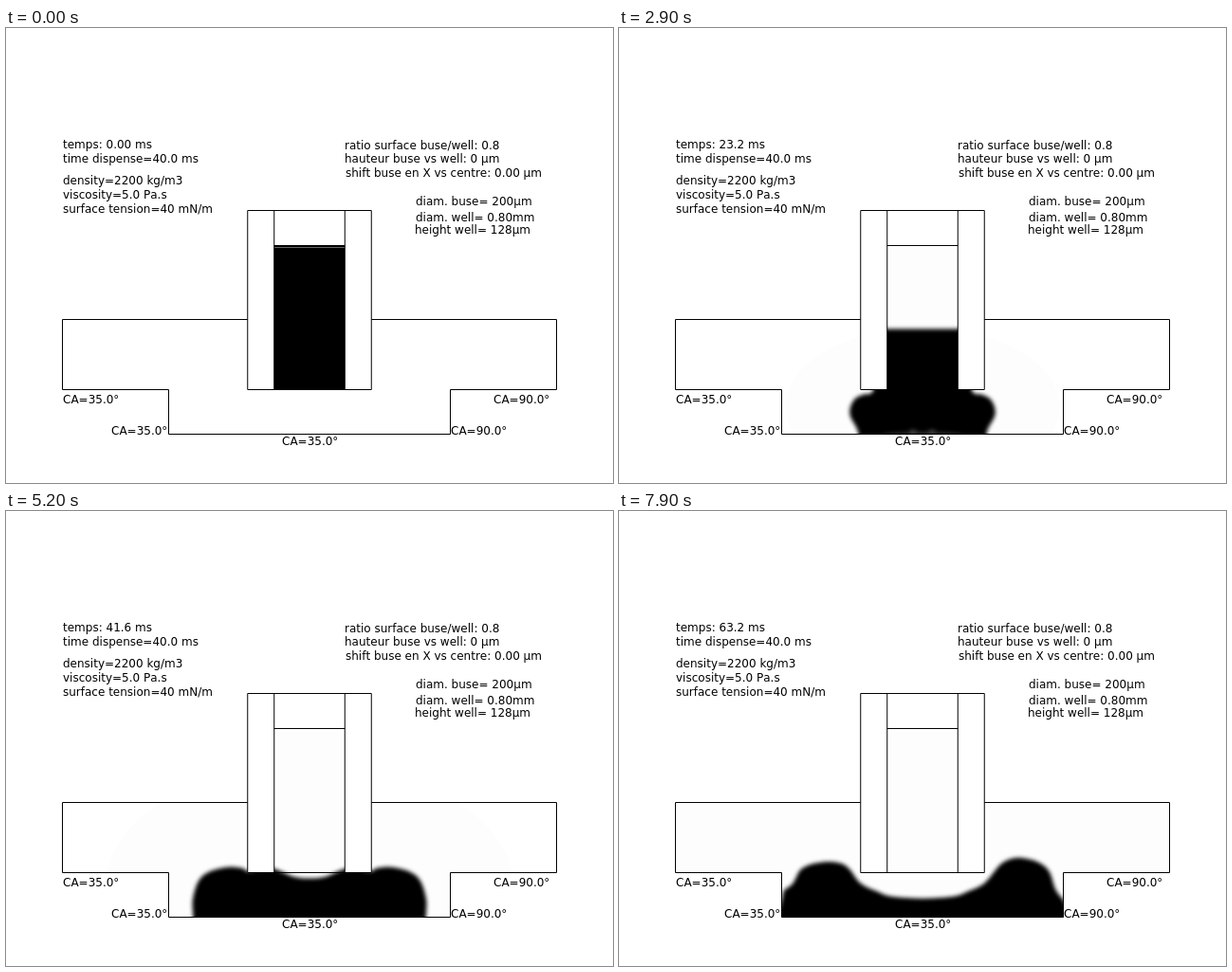
An HTML page that plays this animation: 640 by 480 pixels, repeating every 8 s.

```html
<!DOCTYPE html>
<html lang="fr">
<head>
<meta charset="utf-8">
<style>
  html, body { margin: 0; width: 100%; height: 100%; overflow: hidden; background: #fff; }
  svg { display: block; }
  .label {
    position: absolute; white-space: pre; color: #000;
    font: 12px/14px "DejaVu Sans", sans-serif; font-kerning: none;
  }
</style>
</head>
<body>
<svg width="640" height="480" viewBox="0 0 640 480">
  <defs>
    <clipPath id="cavity">
      <path d="M59.5 307.5H254.75V381.5H282.75V229.5H357.25V381.5H385.25V307.5H580.5V381.5H468.5V428.5H171.5V381.5H59.5Z"/>
    </clipPath>
    <filter id="soft" filterUnits="userSpaceOnUse" x="0" y="150" width="640" height="330">
      <feGaussianBlur stdDeviation="2"/>
    </filter>
  </defs>
  <g clip-path="url(#cavity)">
    <g id="haze" fill="#fdfdfd">
      <ellipse id="halo" cx="320" cy="400"/>
      <rect x="282" y="229" width="76" height="153"/>
    </g>
    <path id="liquid"/>
    <g id="film" filter="url(#soft)" fill="#aaa">
      <ellipse cx="310" cy="428" rx="5" ry="4"/>
      <ellipse cx="330" cy="428" rx="5" ry="4"/>
      <ellipse cx="320" cy="429" rx="42" ry="3" fill="#555"/>
    </g>
    <path id="skin" d="M283 231.5H357" stroke="#666"/>
  </g>
  <path fill="none" stroke="#000" d="M254.75 307.5H59.5V381.5H171.5V428.5H468.5V381.5H580.5V307.5H385.25
    M254.75 192.5H385.25V381.5H254.75ZM282.75 192.5V381.5M357.25 192.5V381.5M282.75 229.5H357.25"/>
</svg>
<script>
const $ = id => document.getElementById(id);
const LOOP = 8000, STEP = 100, CX = 320;

// Each label stands with its baseline at y
function label(x, y, str) {
  const el = document.createElement('div');
  el.className = 'label';
  el.style.left = x + 'px';
  el.style.top = y - 11 + 'px';
  el.textContent = str;
  return document.body.appendChild(el);
}
const clock = label(60, 127, '');
label(60, 142, 'time dispense=40.0 ms');
label(60, 165, 'density=2200 kg/m3');
label(60, 180, 'viscosity=5.0 Pa.s');
label(60, 195, 'surface tension=40 mN/m');
label(357, 128, 'ratio surface buse/well: 0.8');
label(357, 142, 'hauteur buse vs well: 0 µm');
label(358, 157, 'shift buse en X vs centre: 0.00 µm');
label(432, 187, 'diam. buse= 200µm');
label(432, 204, 'diam. well= 0.80mm');
label(431, 217, 'height well= 128µm');
label(60, 396, 'CA=35.0°');
label(111, 429, 'CA=35.0°');
label(291, 440, 'CA=35.0°');
label(469, 429, 'CA=90.0°');
label(514, 396, 'CA=90.0°');

const ramp = (t, a, b) => Math.min(1, Math.max(0, (t - a) / (b - a)));
const mix = (a, b, k) => a + (b - a) * k;

// Height of the liquid on the axis: drains steadily, then settles
const surfaceAt = t => t < 5.2 ? 229 + 30.5 * t : 409 - 21.4 * Math.exp((5.2 - t) / .6);

// Half outline at t seconds, from below the floor, out, up and in towards the axis
function halfOutline(t, left) {
  const landed = ramp(t, 1.8, 2.4);
  const freed = ramp(t, 5.2, 6);
  const climb = ramp(t, 6.3, 7.9);
  const tilt = left ? 4 * freed : 0;

  const spread = t - 1.8;
  const sideX = Math.min(141, Math.max(36, 50.5 + 25 * spread - 1.1 * spread ** 2)) - tilt;
  const footX = sideX - 20 * (1 - ramp(t, 1.8, 3.8)) + 10 * climb;
  const footY = 380 + 48 * (1 - Math.exp(-t / .85)) + landed - (left ? 26 : 13) * climb;
  const sideY = mix(381, footY, .56);

  const humpX = sideX - 36 * ramp(t, 1.2, 5.5);
  const humpY = Math.min(sideY - 4, 388 - 22 * ramp(t, 1.8, 6.4) ** 2 + tilt);
  const radius = sideX - humpX;

  const jointX = 42 + 23 * ramp(t, 1.8, 4.5);
  const jointY = 380 + 13 * ramp(left ? t - .8 : t, 5.2, 6.5);

  const centre = surfaceAt(t);
  const wall = centre - 10 * ramp(t, 3, 5.2) ** 2 + 7 * freed;

  return [
    [footX * mix(.6, 1, landed), footY + 2 + 60 * landed],
    [footX, footY],
    [sideX, sideY],
    [humpX + radius * .707, mix(sideY, humpY, .707)],
    [humpX, humpY],
    [humpX - radius * .55, mix(humpY, jointY, .17)],
    [jointX, jointY],
    [48, mix(wall, jointY, .35 * freed)],
    [37, wall],
    [18, mix(centre, wall, .22)]
  ].map(([x, y]) => [CX + (left ? -x : x), y]);
}

// Closed smooth curve; handles follow the neighbours, a third of the segment long
function smooth(pts) {
  const n = pts.length, at = i => pts[(i + n) % n];
  const tangent = i => {
    const [ax, ay] = at(i - 1), [bx, by] = at(i + 1);
    const len = Math.hypot(bx - ax, by - ay) || 1;
    return [(bx - ax) / len, (by - ay) / len];
  };
  const fmt = p => p.map(v => v.toFixed(2)).join(' ');
  let d = 'M' + fmt(pts[0]);
  for (let i = 0; i < n; i++) {
    const p = at(i), q = at(i + 1), u = tangent(i), v = tangent(i + 1);
    const k = Math.hypot(q[0] - p[0], q[1] - p[1]) / 3;
    d += 'C' + [
      [p[0] + u[0] * k, p[1] + u[1] * k],
      [q[0] - v[0] * k, q[1] - v[1] * k],
      q
    ].map(fmt).join(' ');
  }
  return d + 'Z';
}

function draw(t) {
  const start = t === 0, ms = t * 8;
  clock.textContent = `temps: ${ms.toFixed(ms < 9.99 ? 2 : 1)} ms`;

  const axis = [CX, surfaceAt(t)];
  $('liquid').setAttribute('d', start
    ? 'M282 229H358V382H282Z'
    : smooth([...halfOutline(t), axis, ...halfOutline(t, true).reverse()]));
  $('liquid').setAttribute('filter', start ? 'none' : 'url(#soft)');

  $('skin').style.display = start ? '' : 'none';
  $('haze').style.display = start ? 'none' : '';
  $('halo').setAttribute('rx', 55 + t * 31);
  $('halo').setAttribute('ry', 20 + t * 22);
  $('film').setAttribute('opacity', .6 * ramp(t, 1.9, 2.4) * (1 - ramp(t, 2.8, 3.5)));
}

const origin = performance.now();
function tick() {
  const t = (performance.now() - origin) % LOOP;
  draw(Math.floor(t / STEP) * STEP / 1000);
  requestAnimationFrame(tick);
}
draw(0);
requestAnimationFrame(tick);
</script>
</body>
</html>
```
